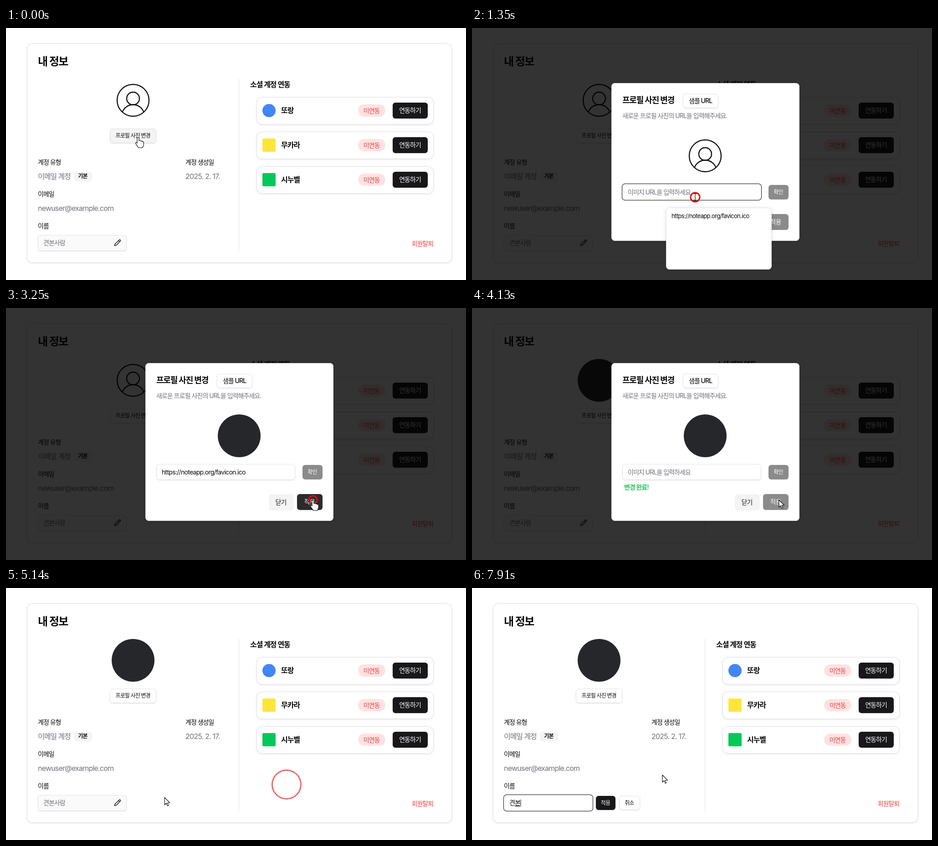
Recreate the animation shown at these times as an HTML page with a canvas. Size 1010 by 554 pixels, loop 8 s.

```html
<!DOCTYPE html>
<html lang="ko">
<head>
<meta charset="utf-8">
<title>내 정보</title>
<style>
  html, body { margin: 0; width: 100%; height: 100%; overflow: hidden; background: #fff; }
  canvas { position: absolute; left: 0; top: 0; }
  #dialog { transform-origin: 512.4px 294.5px; }
</style>
</head>
<body>
<canvas id="page" width="1010" height="554"></canvas>
<canvas id="dialog" width="1010" height="554"></canvas>
<canvas id="top" width="1010" height="554"></canvas>
<script>
const LOOP = 8000;
const INK = '#09090b', DARK = '#18181b', GREY = '#71717a', LINE = '#e4e4e7', PALE = '#f4f4f5', RED = '#ef4444';
const NAME = '견본사람', URL_TEXT = 'https://noteapp.org/favicon.ico';

// Moments of the story, in ms
const OPEN = 271, FOCUS_URL = 1180, PASTE = 1500, BLUR_URL = 2140, CONFIRM = 2400, APPLY = 3400,
      CLOSE = 4676, EDIT = 5600, FOCUS_NAME = 6380, SELECT = 6500, CLEAR = 7460, TYPE = 7610;
const TYPED = ['ㄱ', '겨', '견', '견ㅂ', '견보', '견본'];

// Pointer: time, x, y, shape from then on
const TRACK = [
  [0, 290, 240, 'hand'], [120, 286, 238, 'hand'], [OPEN, 286, 238, 'arrow'], [930, 286, 238, 'arrow'],
  [1130, 490, 372, 'beam'], [1700, 490, 372, 'beam'], [1900, 664, 361, 'hand'], [CONFIRM, 664, 361, 'arrow'],
  [2600, 664, 361, 'arrow'], [2860, 674, 422, 'hand'], [APPLY, 674, 422, 'arrow'], [4150, 674, 422, 'arrow'],
  [4420, 616, 432, 'hand'], [4640, 616, 432, 'hand'], [4710, 604, 432, 'hand'], [4760, 604, 432, 'arrow'],
  [5350, 245, 472, 'hand'], [EDIT, 245, 472, 'beam'], [5900, 225, 428, 'arrow'], [6230, 227, 465, 'beam'],
  [6350, 97, 472, 'beam'], [6600, 97, 472, 'beam'], [7000, 418, 411, 'arrow']
];
// Clicks: time, x, y
const CLICKS = [[120, 286, 238], [1150, 490, 372], [2120, 664, 361], [3070, 674, 422],
                [4510, 616, 432], [5510, 245, 472], [6370, 97, 472]];

const SHAPES = {
  arrow: new Path2D('M0 0v16l3.7-3.4 2.6 5.8 2.4-1-2.5-5.7h5.2z'),
  hand: new Path2D('M-2 2c0-2.6 4-2.6 4 0v6c.6-1.2 3.6-1 3.8.8 .8-1 3.4-.6 3.5 1.2 1-.7 2.9-.2 2.9 1.6v5' +
    'c0 3-2 4-2.4 6.6h-9.4c-.3-2.6-3.2-4-5-8-1.6-3-.4-4.6 1.2-3.6l1.4 1.6z'),
  beam: new Path2D('M-3.5-8h3l.5.5.5-.5h3M0-7.5v15M-3.5 8h3l.5-.5.5.5h3')
};
const PENCIL = new Path2D('M17 3a2.85 2.83 0 1 1 4 4L7.5 20.5 2 22l1.5-5.5ZM15 5l4 4');

const layer = id => document.getElementById(id).getContext('2d');
const page = layer('page'), dialog = layer('dialog'), over = layer('top');
let c = page, mouse;

const ease = x => 1 - Math.pow(1 - Math.min(1, Math.max(0, x)), 2.3);
const smooth = x => x * x * (3 - 2 * x);

function start(ctx) {
  c = ctx;
  c.clearRect(0, 0, 1010, 554);
}

function box(x, y, w, h, r, fill, border, shadow) {
  c.save();
  c.beginPath();
  c.roundRect(x, y, w, h, r);
  if (shadow) {
    c.shadowColor = 'rgba(0,0,0,.12)';
    c.shadowBlur = shadow;
    c.shadowOffsetY = 1;
  }
  c.fillStyle = fill;
  c.fill();
  c.restore();
  if (border) {
    c.beginPath();
    c.roundRect(x + .5, y + .5, w - 1, h - 1, r);
    c.strokeStyle = border;
    c.lineWidth = 1;
    c.stroke();
  }
}

// y is the middle of the line; returns the width
function text(s, x, y, size, weight = 400, color = INK, align = 'left') {
  const gap = size * (/[ㄱ-힣]/.test(s) ? -.068 : -.05);
  c.font = `${weight} ${size}px Inter, "Noto Sans CJK KR", sans-serif`;
  c.letterSpacing = gap + 'px';
  c.textAlign = 'left';
  c.fillStyle = color;
  const w = c.measureText(s).width;
  if (align === 'center') x -= (w - gap) / 2;
  c.fillText(s, x, y + size * .355);
  return w;
}

function disc(x, y, r, fill) {
  c.beginPath();
  c.arc(x, y, r, 0, 7);
  c.fillStyle = fill;
  c.fill();
}

const inside = (x, y, w, h) => mouse.x >= x && mouse.x <= x + w && mouse.y >= y && mouse.y <= y + h;

function solidButton(s, x, y, w, h, size, enabled = true) {
  c.globalAlpha = !enabled ? .5 : inside(x, y, w, h) ? .9 : 1;
  box(x, y, w, h, 6, DARK, null, enabled ? 2 : 0);
  c.globalAlpha = 1;
  text(s, x + w / 2, y + h / 2, size, 500, '#fafafa', 'center');
}

function lineButton(s, x, y, w, h, size, hot) {
  box(x, y, w, h, 6, hot ? PALE : '#fff', LINE, 2);
  text(s, x + w / 2, y + h / 2, size, 500, INK, 'center');
}

function field(x, y, w, h, focus, fill = '#fff') {
  if (focus) box(x - 1, y - 1, w + 2, h + 2, 7, INK);
  box(x, y, w, h, 6, fill, focus ? null : LINE, focus ? 0 : 2);
}

function avatar(x, y, changed) {
  if (changed) return disc(x, y, 47, '#26272a');
  c.save();
  c.strokeStyle = '#111';
  c.lineWidth = 2.4;
  c.beginPath();
  c.arc(x, y, 35, 0, 7);
  c.stroke();
  c.clip();
  c.beginPath();
  c.arc(x, y - 4, 14, 0, 7);
  c.stroke();
  c.beginPath();
  c.ellipse(x, y + 33, 24.5, 23.5, 0, Math.PI, 0);
  c.stroke();
  c.restore();
}

function nameField(t) {
  const editing = t >= EDIT, focus = t >= FOCUS_NAME;
  field(70, 455, 195, 35, focus, editing ? '#fff' : '#fafafa');
  if (!editing) {
    text(NAME, 82, 472, 14, 400, GREY);
    c.save();
    c.translate(237, 464);
    c.scale(2 / 3, 2 / 3);
    c.strokeStyle = INK;
    c.lineWidth = 2;
    c.lineJoin = c.lineCap = 'round';
    c.stroke(PENCIL);
    c.restore();
    return;
  }
  solidButton('적용', 272, 457, 43, 31, 12);
  lineButton('취소', 323, 457, 46, 31, 12);
  if (t < CLEAR) {
    const selected = t >= SELECT;
    if (selected) box(83, 465, 46, 15, 0, '#0078d7');
    text(NAME, 82, 472, 14, 400, selected ? '#fff' : INK);
    return;
  }
  const n = Math.floor((t - TYPE) / 60);
  const s = n < 0 ? '' : TYPED[Math.min(n, TYPED.length - 1)];
  const w = text(s, 82, 472, 14);
  if (s) box(82 + w - 12, 479, 12, 1, 0, INK);
  box(82.5 + w, 465, 1, 15, 0, INK);
}

function drawPage(t, shown) {
  start(page);
  box(0, 0, 1010, 554, 0, '#fff');
  box(46, 34, 933, 482, 12, '#fff', LINE, 4);
  text('내 정보', 70, 73, 24, 600);
  avatar(279, 159, t >= APPLY);
  lineButton('프로필 사진 변경', 228, 221, 102, 32, 12, shown === 0 && inside(228, 221, 102, 32));

  text('계정 유형', 70, 295, 14, 500);
  text('이메일 계정', 70, 326, 16, 400, GREY);
  box(149, 316, 40, 21, 6, PALE);
  text('기본', 169, 326, 12, 600, INK, 'center');
  text('계정 생성일', 394, 295, 14, 500);
  text('2025. 2. 17.', 394, 326, 16, 400, GREY);
  text('이메일', 70, 365, 14, 500);
  text('newuser@example.com', 70, 396, 16, 400, GREY);
  text('이름', 70, 435, 14, 500);
  nameField(t);

  box(511, 112, 1, 380, 0, LINE);
  text('소셜 계정 연동', 536, 124, 16, 600);
  ['또랑', '무카라', '시누벨'].forEach((s, i) => {
    const y = 152 + i * 76;
    box(550, y, 389, 60, 12, '#fff', LINE, 4);
    if (i) box(563, y + 15, 29, 29, 2, i === 1 ? '#ffe53b' : '#06c75a');
    else disc(577.5, y + 29.5, 14.5, '#4285f4');
    text(s, 604, y + 29, 16, 600);
    box(773, y + 16, 60, 27, 13.5, '#fee2e2');
    text('미연동', 803, y + 30, 14, 400, RED, 'center');
    solidButton('연동하기', 849, y + 12, 77, 35, 14);
  });
  text('회원탈퇴', 915, 474, 14, 400, RED, 'center');

  box(0, 0, 1010, 554, 0, `rgba(0,0,0,${.8 * shown})`);
}

function drawDialog(t, shown) {
  const style = dialog.canvas.style;
  style.opacity = shown;
  style.transform = `translateY(${7 * (1 - shown)}px) scale(${.95 + .05 * shown})`;
  if (!shown) return;

  start(dialog);
  box(306, 121, 413, 347, 8, '#fff', LINE, 8);
  text('프로필 사진 변경', 330, 159, 18, 600);
  lineButton('샘플 URL', 463, 145, 78, 31, 14);
  text('새로운 프로필 사진의 URL을 입력해주세요.', 330, 193, 14, 400, GREY);
  avatar(512, 281, t >= CONFIRM);

  const filled = t >= PASTE && t < APPLY, focus = t >= FOCUS_URL && t < BLUR_URL;
  field(330, 343, 305, 35, focus);
  if (filled) text(URL_TEXT, 342, 361, 14);
  else text('이미지 URL을 입력하세요', 342, 361, 14, 400, GREY);
  solidButton('확인', 651, 345, 44, 32, 12, filled && t < CONFIRM);
  if (t >= APPLY) text('변경 완료!', 334, 394, 14, 600, '#22c55e');
  box(577, 409, 55, 36, 6, PALE);
  text('닫기', 604, 427, 14, 500, DARK, 'center');
  solidButton('적용', 639, 409, 56, 35, 14, t >= CONFIRM && t < APPLY);
}

function drawTop(t) {
  start(over);
  if (t >= FOCUS_URL && t < PASTE) {
    box(426, 395, 232, 136, 8, '#fff', LINE, 8);
    text(URL_TEXT, 438, 413, 13);
  }
  for (const [at, x, y] of CLICKS) {
    const age = t - at;
    if (age < 0 || age > 800) continue;
    c.globalAlpha = 1 - Math.pow(age / 800, 4);
    c.beginPath();
    c.arc(x, y, age * .05, 0, 7);
    c.strokeStyle = '#e01010';
    c.lineWidth = 3;
    c.stroke();
    c.globalAlpha = 1;
  }
  c.save();
  c.translate(mouse.x, mouse.y);
  c.lineJoin = 'round';
  c.lineWidth = 1.1;
  c.fillStyle = '#fff';
  c.strokeStyle = '#000';
  if (mouse.shape !== 'beam') c.fill(SHAPES[mouse.shape]);
  c.stroke(SHAPES[mouse.shape]);
  c.restore();
}

function pointer(t) {
  const i = TRACK.findLastIndex(k => k[0] <= t);
  const [t0, x0, y0, shape] = TRACK[i];
  const [t1, x1, y1] = TRACK[i + 1] || [LOOP, x0, y0];
  const k = smooth((t - t0) / (t1 - t0));
  return { x: x0 + (x1 - x0) * k, y: y0 + (y1 - y0) * k, shape };
}

function frame(now) {
  const t = Math.max(0, now) % LOOP;
  const shown = t < CLOSE ? ease((t - OPEN) / 200) : 1 - ease((t - CLOSE) / 200);
  mouse = pointer(t);
  drawPage(t, shown);
  drawDialog(t, shown);
  drawTop(t);
  requestAnimationFrame(frame);
}
requestAnimationFrame(frame);
</script>
</body>
</html>
```
